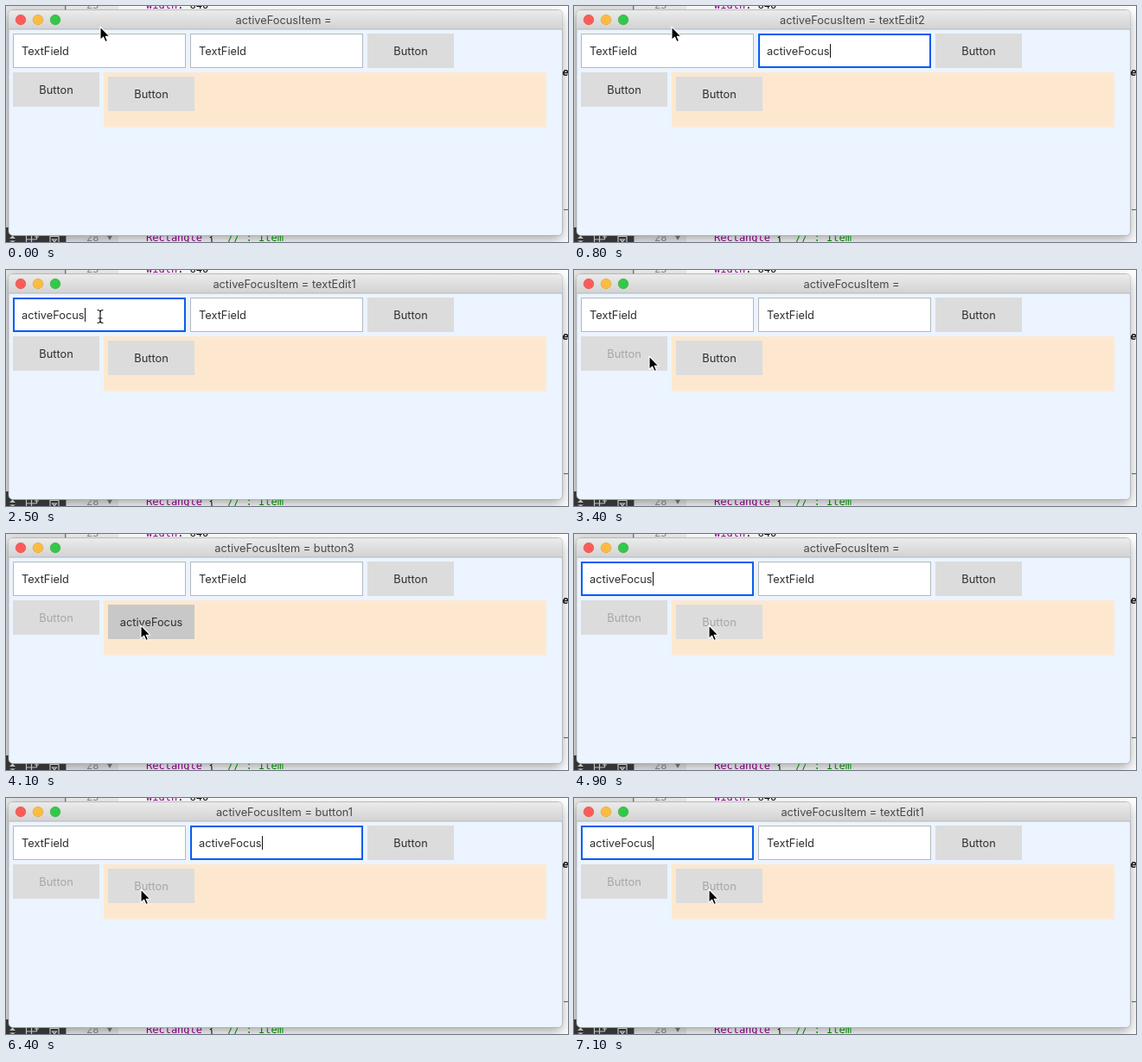
An HTML page for the animation above (7200 ms loop, 650x274 px).

```html
<!DOCTYPE html>
<html lang="en">
<head>
<meta charset="utf-8">
<title>Focus demo</title>
<style>
  html, body { margin: 0; width: 100%; height: 100%; overflow: hidden; background: #ececec; }
  svg { display: block; width: 650px; height: 274px; }
  text { font: 12.8px Inter, "Open Sans", sans-serif; fill: #2b2d2f; white-space: pre; }
  .mid { text-anchor: middle; }
  .code { font: 12px "DejaVu Sans Mono", monospace; }
</style>
</head>
<body>
<svg viewBox="0 0 650 274" xmlns="http://www.w3.org/2000/svg">
  <defs>
    <linearGradient id="bar" x2="0" y2="1">
      <stop offset="0" stop-color="#ebebeb"/>
      <stop offset="1" stop-color="#d2d2d2"/>
    </linearGradient>
    <filter id="blur" x="-5%" y="-10%" width="110%" height="120%">
      <feGaussianBlur stdDeviation="7"/>
    </filter>
  </defs>

  <!-- editor behind the window -->
  <rect width="650" height="274" fill="#fff"/>
  <rect width="69" height="274" fill="#e4e4e4"/>
  <rect x="70" width="60" height="274" fill="#efefef"/>
  <rect x="68" width="1.5" height="20" fill="#777"/>
  <rect x="3" y="10" width="640" height="261" rx="5" opacity=".36" filter="url(#blur)"/>
  <rect y="257" width="69.5" height="17" fill="#343434"/>
  <g fill="none" stroke="#c4c4c4" stroke-width="1.2">
    <path d="M4 270l3.5-3.500 3.500 3.500zM4 272.500h7l-3.500 2z" fill="#c4c4c4" stroke="none"/>
    <path d="M23.500 266v8M23.500 271h12M29.500 267v7M33 268h5M35.500 266v5"/>
    <path d="M51 274v-6.500h10v6.500M53.500 271h5l-2.500 3z"/>
  </g>
  <g>
    <text class="code" x="93" y="3" style="fill:#8a8a8a">23</text>
    <text class="code" x="162" y="3" style="fill:#800080">width<tspan fill="#111">: 640</tspan></text>
    <text class="code" x="93" y="273" style="fill:#777">28</text>
    <path d="M116.500 266h7l-3.500 6z" fill="#666"/>
    <text class="code" x="162" y="273" style="fill:#800080">Rectangle<tspan fill="#111"> {  </tspan><tspan fill="#008000">// : Item</tspan></text>
    <text class="code" x="643.500" y="81" font-style="italic" style="font-style:italic;font-weight:bold;fill:#111">e</text>
    <path d="M645 236.500h5" stroke="#2f8f2f" stroke-width="1.2"/>
  </g>

  <!-- window -->
  <rect x="3" y="4.500" width="640.500" height="262" rx="5" fill="#ebf4ff" stroke="#a2a6aa" stroke-width=".7"/>
  <path d="M3 27V10q0-5 5-5H638.500q5 0 5 5V27z" fill="url(#bar)"/>
  <path d="M3 27h640.500" stroke="#b4b6b8"/>
  <g stroke-width=".6">
    <circle cx="17" cy="16" r="5.800" fill="#fc5b57" stroke="#df4744"/>
    <circle cx="37" cy="16" r="5.800" fill="#fdbc40" stroke="#de9f34"/>
    <circle cx="57" cy="16" r="5.800" fill="#34c84a" stroke="#27aa35"/>
  </g>
  <text id="title" class="mid" x="322" y="21" style="fill:#474747"></text>
  <rect x="113" y="77" width="512" height="63.500" fill="#fde8cf"/>
  <g id="items"></g>

  <path id="arrow" d="M0 0V15.500L3.600 12.200L6 17.600L8.500 16.500L6.200 11.300H11z" fill="#000" stroke="#fff" stroke-width="1.100" stroke-linejoin="round"/>
  <g id="beam" fill="none" stroke-linecap="round">
    <path d="M-3-7.500Q0-7.500 0-5Q0-7.500 3-7.500M0-5V5M-3 7.500Q0 7.500 0 5Q0 7.500 3 7.500M-2 2H2" stroke="#fff" stroke-width="2.600"/>
    <path d="M-3-7.500Q0-7.500 0-5Q0-7.500 3-7.500M0-5V5M-3 7.500Q0 7.500 0 5Q0 7.500 3 7.500M-2 2H2" stroke="#111" stroke-width="1.200"/>
  </g>
</svg>
<script>
const LOOP = 7200, STEP = 100, BLUE = '#0a5cf0';
const byId = id => document.getElementById(id);

function add(parent, tag, attrs) {
  const el = document.createElementNS('http://www.w3.org/2000/svg', tag);
  for (const key in attrs) el.setAttribute(key, attrs[key]);
  return parent.appendChild(el);
}

function makeItem(name, x, y, w) {
  const isField = name.startsWith('text');
  const box = add(byId('items'), 'rect');
  const label = add(byId('items'), 'text', isField
    ? { x: x + 10, y: y + 24.6 }
    : { x: x + w / 2, y: y + 24.6, class: 'mid' });
  const caret = isField && add(byId('items'), 'rect', { y: y + 12, width: 1, height: 16, fill: '#111' });
  return { name, x, y, w, isField, box, label, caret };
}

const items = [
  makeItem('textEdit1', 8, 32, 200),
  makeItem('textEdit2', 213, 32, 200),
  makeItem('button1', 418, 32, 100),
  makeItem('button2', 8, 77, 100),
  makeItem('button3', 118, 82, 100)
];

// when each item takes the focus
const focusLog = [
  [0, ''], [100, 'textEdit1'], [500, 'textEdit2'], [900, 'button1'],
  [1400, 'textEdit2'], [2000, 'textEdit1'], [2900, 'button2'], [3200, ''],
  [4000, 'button3'], [4300, ''], [4900, 'textEdit1'], [5400, 'textEdit2'],
  [5900, 'button1'], [6400, 'textEdit2'], [6800, 'textEdit1']
];
const pressed = { button2: [2900, 3100], button3: [4000, 4200] };
const disabledAt = { button2: 3200, button3: 4300 };

// pointer keys: time, x, y
const pointer = [
  [0, 109, 24], [300, 113, 24], [2400, 113, 24], [2500, 109, 54],
  [2600, 101, 78], [2700, 91, 94], [2800, 87, 100], [3400, 87, 100],
  [3500, 96, 101], [3700, 142, 105], [3800, 156, 106], [LOOP, 156, 106]
];

function focusAt(t) {
  let name = '';
  for (const [at, item] of focusLog) if (t >= at) name = item;
  return name;
}

function pointerAt(t) {
  const i = pointer.findIndex(key => key[0] > t);
  const [t0, x0, y0] = pointer[i - 1], [t1, x1, y1] = pointer[i];
  const k = (t - t0) / (t1 - t0);
  return [x0 + (x1 - x0) * k, y0 + (y1 - y0) * k];
}

function drawItem(item, t, focus) {
  const { name, x, y, w, isField, box, label, caret } = item;
  const active = focus === name;
  const [from, to] = pressed[name] || [0, 0];
  const down = t >= from && t < to;
  const off = t >= disabledAt[name];
  const keyFocus = active && name === 'button1';
  const line = active && isField || keyFocus ? 2 : isField ? 1 : 0;
  const fill = isField ? '#fff' : keyFocus ? '#e5efff' : down ? '#c8c8c8' : '#dcdcdc';
  const set = {
    x: x + line / 2, y: y + line / 2, width: w - line, height: 40 - line,
    fill, stroke: line === 2 ? BLUE : '#b4b8bc', 'stroke-width': line
  };
  for (const key in set) box.setAttribute(key, set[key]);
  label.textContent = active ? 'activeFocus' : isField ? 'TextField' : 'Button';
  label.style.fill = keyFocus ? BLUE : off ? '#a6a7a8' : '#2b2d2f';
  if (caret) {
    caret.setAttribute('x', Math.round(x + 10 + label.getComputedTextLength()));
    caret.style.display = active ? '' : 'none';
  }
}

function draw(time) {
  const t = Math.floor(time % LOOP / STEP) * STEP;
  const focus = focusAt(t);
  items.forEach(item => drawItem(item, t, focus));
  // the title bar follows one step later
  byId('title').textContent = ('activeFocusItem = ' + focusAt(t - STEP)).trim();
  byId('title').setAttribute('x', focusAt(t - STEP) ? 322 : 321);

  const [x, y] = pointerAt(t);
  const overField = y >= 32 && y < 72;
  byId('arrow').style.display = overField ? 'none' : '';
  byId('beam').style.display = overField ? '' : 'none';
  byId('arrow').setAttribute('transform', `translate(${x} ${y})`);
  byId('beam').setAttribute('transform', `translate(${x} ${y})`);
}

const start = performance.now();
function tick() {
  draw(performance.now() - start);
  requestAnimationFrame(tick);
}
tick();
</script>
</body>
</html>
```
